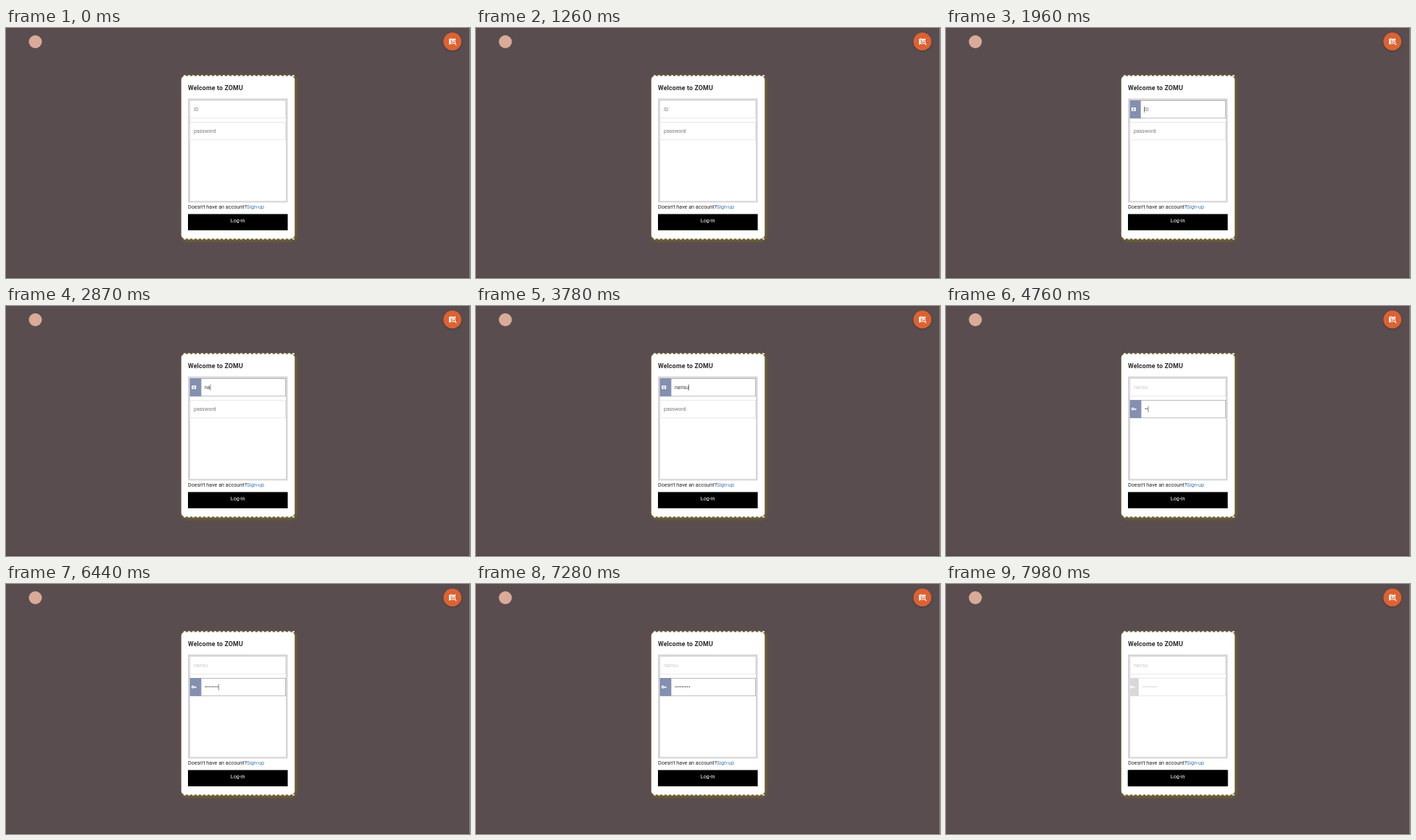
An HTML page with a canvas for the animation above (8000 ms loop, 640 by 346 pixels).

```html
<!DOCTYPE html>
<html lang="en">
<head>
<meta charset="utf-8">
<title>Log-in</title>
<style>
html, body { margin: 0; width: 100%; height: 100%; overflow: hidden; background: #594d4f; }
canvas { display: block; width: 640px; height: 346px; }
</style>
</head>
<body>
<canvas id="stage"></canvas>
<script>
const W = 640, H = 346, LOOP = 8000;
const FONT = 'Roboto, "Liberation Sans", sans-serif';
const canvas = document.getElementById('stage');
const ctx = canvas.getContext('2d');
const dpr = window.devicePixelRatio || 1;
canvas.width = W * dpr;
canvas.height = H * dpr;

const fields = [
  { y: 100.5, hint: 'ID', value: 'narisu', icon: drawBadge,
    focus: 1740, blur: 4120, keys: [2660, 2870, 3080, 3220, 3430, 3640] },
  { y: 130.5, hint: 'password', value: '•'.repeat(9), icon: drawKey,
    focus: 4120, blur: 7930, keys: [4620, 4760, 4970, 5180, 5530, 5740, 6020, 6300, 6510] }
];

// CSS "ease": cubic-bezier(.25, .1, .25, 1)
function ease(x) {
  if (x <= 0) return 0;
  if (x >= 1) return 1;
  const curve = (a, b, u) => 3 * a * u * (1 - u) ** 2 + 3 * b * u * u * (1 - u) + u ** 3;
  let lo = 0, hi = 1;
  for (let i = 0; i < 24; i++) {
    const mid = (lo + hi) / 2;
    if (curve(.25, .25, mid) < x) lo = mid; else hi = mid;
  }
  return curve(.1, 1, lo);
}

function rect(x, y, w, h, color) {
  ctx.fillStyle = color;
  ctx.fillRect(x, y, w, h);
}

function round(x, y, w, h, r, color) {
  ctx.fillStyle = color;
  ctx.beginPath();
  ctx.roundRect(x, y, w, h, r);
  ctx.fill();
}

function disc(x, y, r, color) {
  ctx.fillStyle = color;
  ctx.beginPath();
  ctx.arc(x, y, r, 0, Math.PI * 2);
  ctx.fill();
}

function text(str, x, y, color, { size = 7, weight = 400, align = 'left', spacing = 0 } = {}) {
  ctx.font = `${weight} ${size}px ${FONT}`;
  ctx.textAlign = align;
  ctx.letterSpacing = spacing + 'px';
  ctx.fillStyle = color;
  ctx.fillText(str, x, y);
  return ctx.measureText(str).width;
}

function glow(color, blur, dx, dy) {
  ctx.shadowColor = color;
  ctx.shadowBlur = blur * dpr;
  ctx.shadowOffsetX = dx * dpr;
  ctx.shadowOffsetY = dy * dpr;
}

function drawBadge(x, y, hole) {
  round(x - 3, y - 2.5, 6, 5, .6, '#fff');
  disc(x, y - .8, .9, hole);
  rect(x - 1.6, y + .7, 3.2, .9, hole);
}

function drawKey(x, y, hole) {
  disc(x - 1.5, y, 1.9, '#fff');
  rect(x, y - .6, 3.4, 1.3, '#fff');
  rect(x + 1.6, y, 1.2, 1.7, '#fff');
  disc(x - 1.5, y, .7, hole);
}

function drawMapButton() {
  const orange = '#dd6232';
  ctx.save();
  glow('rgba(0,0,0,.25)', 3, 0, 1);
  disc(615.7, 18.7, 12.4, orange);
  ctx.restore();
  // folded map
  ctx.fillStyle = '#fff';
  ctx.beginPath();
  ctx.moveTo(611, 15.2);
  ctx.lineTo(614, 14.2);
  ctx.lineTo(617, 15.2);
  ctx.lineTo(620, 14.2);
  ctx.lineTo(620, 22);
  ctx.lineTo(617, 23);
  ctx.lineTo(614, 22);
  ctx.lineTo(611, 23);
  ctx.fill();
  rect(613.6, 15.4, 1, 6, orange);
  // magnifier
  disc(618, 20.2, 3.2, orange);
  ctx.strokeStyle = '#fff';
  ctx.lineWidth = 1.1;
  ctx.beginPath();
  ctx.arc(617.8, 19.9, 1.8, 0, Math.PI * 2);
  ctx.moveTo(619.1, 21.2);
  ctx.lineTo(621.2, 23.6);
  ctx.stroke();
}

function drawCard() {
  ctx.save();
  glow('#7d6f22', 5, 1.5, 1.5);
  round(241.8, 65.5, 156.4, 227, 5, '#6a5f30');
  ctx.restore();
  round(241.8, 66.5, 156.4, 225, 5, '#fff');
  // dashed top and bottom edges
  for (let x = 245; x < 398; x += 6) {
    rect(x, 65.3, 3, 1.6, '#fff');
    rect(x, 291.2, 3, 1.4, '#fff');
  }
  text('Welcome to ZOMU', 251, 86.2, '#2b2b2b', { size: 8.8, weight: 600, spacing: .15 });
  rect(251, 97.5, 137.5, 144, '#d8d5d8');
  rect(254, 100.5, 132, 138.8, '#fff');
}

function drawField(f, t) {
  const active = t >= f.focus && t < f.blur;
  const open = ease((t - f.focus) / 300) - ease((t - f.blur) / 300);
  const x = 253.6, w = 132.4, h = 25, base = f.y + 14.7;

  rect(x, f.y, w, h, '#fff');
  ctx.strokeStyle = active ? '#a9a9a9' : '#e2e2e2';
  ctx.lineWidth = .8;
  ctx.strokeRect(x + .4, f.y - .1, w - .8, h - .6);

  if (open > 0) {
    const color = active ? '#8390b0' : '#d9d7d9', bar = 15.8 * open;
    rect(x, f.y - .4, bar, h, color);
    ctx.save();
    ctx.beginPath();
    ctx.rect(x - 1, f.y, bar + 1, h);
    ctx.clip();
    ctx.globalAlpha = Math.min(1, Math.max(0, (open - .4) / .35));
    f.icon(259.2 - 9 * (1 - open), f.y + 12, color);
    ctx.restore();
  }

  const typed = f.keys.filter(k => k <= t).length;
  const left = 259 + 15 * open;
  let width = 0;
  if (typed) width = text(f.value.slice(0, typed), left, base, active ? '#3c3c3c' : '#c8c8c8');
  else text(f.hint, left, base, '#777');

  const last = typed ? f.keys[typed - 1] : f.focus;
  if (active && (t - last) % 1060 < 530) rect(left + width, f.y + 8, .6, 8.5, '#333');
}

function drawFooter(t) {
  const size = 7.2;
  const w = text("Doesn't have an account?", 251, 249.6, '#222', { size });
  text('Sign-up', 251 + w, 249.6, '#3d78b2', { size });
  if (t >= 7930) round(250.4, 256.9, 138.8, 23.4, 1.5, '#8a8a8a');
  round(251, 257.5, 137.6, 22.4, t >= 7930 ? 1 : 0, '#000');
  text('Log-in', 319.7, 269.3, '#fff', { size, align: 'center' });
}

function draw(t) {
  ctx.setTransform(dpr, 0, 0, dpr, 0, 0);
  rect(0, 0, W, H, '#594d4f');
  rect(0, 345, W, 1, '#4b4143');
  rect(639, 0, 1, H, '#8b8284');
  disc(40.5, 19, 9, '#d9ab98');
  drawMapButton();
  drawCard();
  fields.forEach(f => drawField(f, t));
  drawFooter(t);
}

const start = performance.now();
function tick() {
  draw((performance.now() - start) % LOOP);
  requestAnimationFrame(tick);
}
tick();
</script>
</body>
</html>
```
